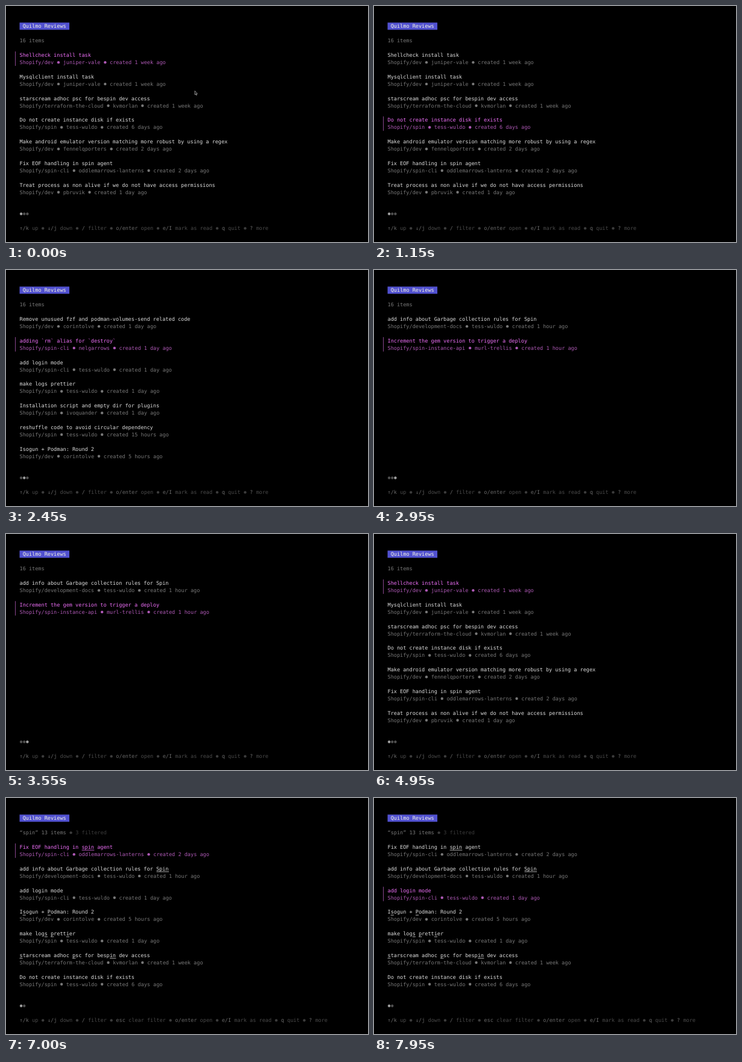
Recreate the animation shown at these times as an HTML page. Size 600 px wide and 390 px high, loop 8000 ms.

```html
<!DOCTYPE html>
<html lang="en">
<head>
<meta charset="utf-8">
<title>Review list</title>
<style>
  html, body { margin: 0; width: 100%; height: 100%; overflow: hidden; background: #000; }
  svg { display: block; width: 600px; height: 390px; }
  text {
    font: 8.566px "DejaVu Sans Mono", "Liberation Mono", monospace;
    text-rendering: geometricPrecision;
    white-space: pre;
  }
</style>
</head>
<body>
<svg id="stage" viewBox="0 0 600 390" xmlns="http://www.w3.org/2000/svg"></svg>
<script>
const LOOP = 8000, LEFT = 22.5, TOP = 27.4, CELL = 5.157, LINE = 11.925, PER_PAGE = 7;

const color = {
  title: '#dddddd', desc: '#777777',
  dimTitle: '#777777', dimDesc: '#4d4d4d',
  pickTitle: '#ee6ff8', pickDesc: '#ad58b4', bar: '#8a468f',
  badge: '#5151d0', badgeText: '#f8f8e4',
  prompt: '#ecfd65', faint: '#3c3c3c',
  key: '#686868', hint: '#4a4a4a',
  dotOn: '#a0a0a0', dotOff: '#505050'
};

// title, repository, author, age
const items = [
  ['Shellcheck install task', 'dev', 'juniper-vale', '1 week'],
  ['Mysqlclient install task', 'dev', 'juniper-vale', '1 week'],
  ['starscream adhoc psc for bespin dev access', 'terraform-the-cloud', 'kvmorlan', '1 week'],
  ['Do not create instance disk if exists', 'spin', 'tess-wuldo', '6 days'],
  ['Make android emulator version matching more robust by using a regex', 'dev', 'fennelqporters', '2 days'],
  ['Fix EOF handling in spin agent', 'spin-cli', 'oddlemarrows-lanterns', '2 days'],
  ['Treat process as non alive if we do not have access permissions', 'dev', 'pbruvik', '1 day'],
  ['Remove unusued fzf and podman-volumes-send related code', 'dev', 'corintolve', '1 day'],
  ['adding `rm` alias for `destroy`', 'spin-cli', 'nelgarrows', '1 day'],
  ['add login mode', 'spin-cli', 'tess-wuldo', '1 day'],
  ['make logs prettier', 'spin', 'tess-wuldo', '1 day'],
  ['Installation script and empty dir for plugins', 'spin', 'ivoquander', '1 day'],
  ['reshuffle code to avoid circular dependency', 'spin', 'tess-wuldo', '15 hours'],
  ['Isogun + Podman: Round 2', 'dev', 'corintolve', '5 hours'],
  ['add info about Garbage collection rules for Spin', 'development-docs', 'tess-wuldo', '1 hour'],
  ['Increment the gem version to trigger a deploy', 'spin-instance-api', 'murl-trellis', '1 hour']
];

// Results per query: shown order, match columns by item, total count
const allItems = { order: items.map((_, i) => i), marks: {}, count: 16 };
const results = {
  '': allItems,
  s: { order: [9, 10, 0, 13, 1, 5, 8], marks: { 5: [20] }, count: 16 },
  sp: {
    order: [13, 9, 10, 0, 1, 11, 2],
    marks: { 13: [1, 9], 10: [8, 10], 11: [13, 38], 2: [0, 17] },
    count: 16
  },
  spi: {
    order: [5, 14, 9, 13, 10, 2, 3],
    marks: { 5: [20, 21, 22], 14: [44, 45, 46], 13: [1, 9], 10: [8, 10, 15], 2: [0, 17, 29] },
    count: 14
  },
  spin: {
    order: [5, 14, 9, 13, 10, 2, 3],
    marks: { 5: [20, 21, 22, 23], 14: [44, 45, 46, 47], 13: [1, 9], 10: [8, 10, 15], 2: [0, 17, 29, 30] },
    count: 13
  }
};

const browseHelp = ['↑/k up', '↓/j down', '/ filter', 'o/enter open', 'e/I mark as read', 'q quit', '? more'];
const appliedHelp = [...browseHelp.slice(0, 3), 'esc clear filter', ...browseHelp.slice(3)];

// [time, selected index] while browsing, [time, query] while typing
const picks = [[0, 0], [300, 1], [600, 2], [900, 3], [1180, 4], [1430, 5], [1680, 6], [1950, 7],
  [2250, 8], [2900, 15], [3800, 8], [4150, 1], [4600, 0]];
const typed = [[5250, ''], [5800, 's'], [5950, 'sp'], [6150, 'spi'], [6300, 'spin']];
const filteredPicks = [[6800, 0], [7200, 1], [7600, 2]];
const FILTER_AT = typed[0][0], APPLY_AT = filteredPicks[0][0], POINTER_UNTIL = 300;

const at = (steps, t) => steps.filter(s => s[0] <= t).pop()[1];
const colX = c => LEFT + c * CELL;
const lineY = l => TOP + l * LINE;
const escapeText = s => s.replace(/&/g, '&amp;').replace(/</g, '&lt;');
const rect = (x, y, w, h, fill) =>
  `<rect x="${x.toFixed(2)}" y="${y.toFixed(2)}" width="${w}" height="${h}" fill="${fill}"/>`;

function dot(col, line, fill) {
  return `<circle cx="${colX(col + .5).toFixed(2)}" cy="${(lineY(line) + 6.1).toFixed(2)}" r="2.2" fill="${fill}"/>`;
}

// Text on the character grid; bullets become round dots
function put(col, line, str, fill) {
  let out = '';
  str.split('•').forEach((part, i) => {
    if (i) out += dot(col++, line, fill);
    const body = part.trim();
    if (body) {
      const x = colX(col + part.indexOf(body));
      out += `<text x="${x.toFixed(2)}" y="${(lineY(line) + 9).toFixed(2)}" fill="${fill}">${escapeText(body)}</text>`;
    }
    col += part.length;
  });
  return out;
}

function drawItem(id, row, marks, look) {
  const [title, repo, user, age] = items[id];
  const line = 4 + row * 3;
  const [titleFill, descFill] = {
    normal: [color.title, color.desc],
    dim: [color.dimTitle, color.dimDesc],
    picked: [color.pickTitle, color.pickDesc]
  }[look];
  let out = put(0, line, title, titleFill);
  out += put(0, line + 1, `Shopify/${repo} • ${user} • created ${age} ago`, descFill);
  for (const c of marks || []) out += rect(colX(c), lineY(line) + 10.6, CELL, .8, titleFill);
  if (look === 'picked') out += rect(15, lineY(line), 1, 2 * LINE, color.bar);
  return out;
}

function drawHelp(entries) {
  let col = 0, out = '';
  entries.forEach((entry, i) => {
    if (i) {
      out += dot(col + 1, 28, color.faint);
      col += 3;
    }
    const key = entry.split(' ')[0];
    out += put(col, 28, key, color.key);
    out += put(col + key.length + 1, 28, entry.slice(key.length + 1), color.hint);
    col += entry.length;
  });
  return out;
}

function drawHeader(typing, query) {
  if (!typing) return rect(LEFT, TOP, 16 * CELL, LINE, color.badge) + put(1, 0, 'Quilmo Reviews', color.badgeText);
  return put(0, 0, 'Filter:', color.prompt) + put(8, 0, query, color.title) +
    rect(colX(8 + query.length), TOP, CELL, LINE, color.pickTitle);
}

function stateAt(t) {
  if (t < FILTER_AT) return { mode: 'browse', query: '', pick: at(picks, t) };
  if (t < APPLY_AT) return { mode: 'typing', query: at(typed, t), pick: 0 };
  return { mode: 'applied', query: 'spin', pick: at(filteredPicks, t) };
}

function draw({ mode, query, pick }, pointer) {
  const typing = mode === 'typing', applied = mode === 'applied';
  const { order, marks, count } = results[query];
  const page = Math.floor(pick / PER_PAGE);
  let out = drawHeader(typing, query);

  if (applied) {
    out += put(0, 2, `“${query}” ${count} items`, color.desc) + put(16, 2, '• 3 filtered', color.faint);
  } else {
    out += put(0, 2, `${count} items`, color.desc);
  }

  order.slice(page * PER_PAGE, (page + 1) * PER_PAGE).forEach((id, row) => {
    const picked = !typing && row === pick % PER_PAGE;
    const look = picked ? 'picked' : typing && !query ? 'dim' : 'normal';
    out += drawItem(id, row, marks[id], look);
  });

  for (let p = 0; p < Math.ceil(count / PER_PAGE); p++) {
    out += dot(p, 26, p === page ? color.dotOn : color.dotOff);
  }

  const typingHelp = query ? ['enter apply filter', 'esc cancel'] : ['esc cancel'];
  out += drawHelp(typing ? typingHelp : applied ? appliedHelp : browseHelp);

  if (pointer) {
    out += '<path d="M313 140.3v6.2l1.4-1.2 1 2.2 1-.5-1-2.1h1.8z" fill="#000" stroke="#ccc" stroke-width=".7"/>';
  }
  return out;
}

const stage = document.getElementById('stage');
let shown = '';

function render(t) {
  const state = stateAt(t), pointer = t < POINTER_UNTIL;
  const key = JSON.stringify([state, pointer]);
  if (key === shown) return;
  shown = key;
  stage.innerHTML = draw(state, pointer);
}

const start = performance.now();
function tick() {
  render((performance.now() - start) % LOOP);
  requestAnimationFrame(tick);
}
tick();
</script>
</body>
</html>
```
